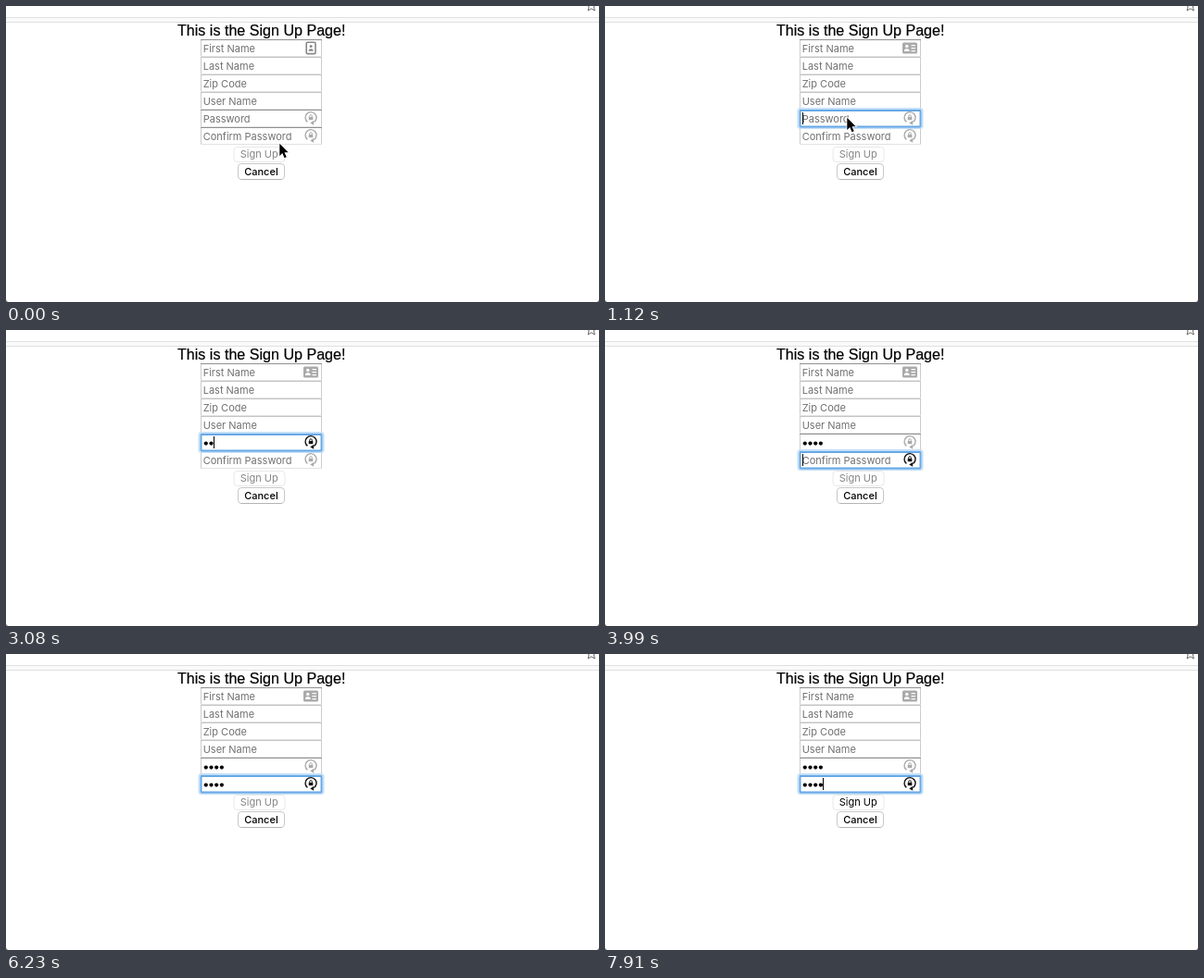
An HTML page that plays this animation: 640 px wide and 320 px high, repeating every 8000 ms.

```html
<!DOCTYPE html>
<html lang="en">
<head>
<meta charset="utf-8">
<title>Sign up form</title>
<style>
html, body { margin: 0; width: 100%; height: 100%; overflow: hidden; background: #fff; }
svg { display: block; }
text { font: 11px Inter, Roboto, sans-serif; fill: #717171; }
.title { font: 16.08px "Liberation Sans", Arial, sans-serif; fill: #000; stroke: #000; stroke-width: .2px; }
.button { text-anchor: middle; }
.lock { color: #aaa; }
.lock.active { color: #111; }
</style>
</head>
<body>
<svg width="640" height="320" viewBox="0 0 640 320">
  <defs>
    <g id="lock" fill="none" stroke="currentColor">
      <path d="M-3.6 4.6A6 6 0 1 1 3.4 4.8" stroke-width="1.4"/>
      <path d="M-.8 5.6L3 3.2 3.2 8Z" fill="currentColor" stroke="none"/>
      <path d="M-1.3 -.6V-1.8A1.3 1.3 0 0 1 1.3 -1.8V-.6" stroke-width=".9"/>
      <path d="M-2.3 -.8H2.3V2.4H-2.3Z" fill="currentColor" stroke="none"/>
    </g>
  </defs>

  <path d="M0 12H640V17H0Z" fill="#fafafa"/>
  <path d="M0 12.5H640M0 17.5H640" stroke="#e0e0e0"/>
  <path d="M626 -1.5L629.2 .6 628.2 5 631.8 2.8 635.4 5 634.4 .6 637.6 -1.5" fill="none" stroke="#666"/>
  <path d="M0 318V320H2ZM640 318V320H638Z" fill="#777"/>
  <text class="title" x="185" y="32">This is the Sign Up Page!</text>

  <g id="fields"></g>

  <g id="badge">
    <rect x="324.2" y="39.2" width="9.8" height="12.4" rx="1.4" fill="#fff" stroke="#888" stroke-width="1.6"/>
    <circle cx="329.1" cy="43.6" r="1.5" fill="#888"/>
    <path d="M326.6 48.8V47.6Q329.1 44.8 331.6 47.6V48.8Z" fill="#888"/>
  </g>
  <g id="card">
    <rect x="321" y="39.5" width="16" height="12" rx="1.5" fill="#aaa"/>
    <circle cx="325.8" cy="43.4" r="1.7" fill="#fff"/>
    <path d="M323 49V47.6Q325.8 44.4 328.6 47.6V49ZM330.5 42H335V43.2H330.5ZM330.5 45H335V46.2H330.5ZM330.5 48H335V49.2H330.5Z" fill="#fff"/>
  </g>

  <g id="ring" fill="none">
    <rect x="208.5" y="111" width="134" height="21" rx="2.5" stroke="#c4dff8" stroke-width="2"/>
    <rect x="210.5" y="113" width="130" height="17.5" rx="1" stroke="#66a8e6" stroke-width="2"/>
  </g>
  <use class="lock" href="#lock" x="329" y="120.8"/>
  <use class="lock" href="#lock" x="329" y="139.8"/>
  <g id="dots"></g>
  <path id="caret" d="M0 0V13" stroke="#000"/>

  <rect x="246" y="152.5" width="55" height="16" rx="3.5" fill="#fff" stroke="#e8e8e8"/>
  <text class="button" id="submit" x="273.3" y="164">Sign Up</text>
  <rect x="250.5" y="170.5" width="50" height="17" rx="3.5" fill="#fff" stroke="#c8c8c8"/>
  <path d="M253.5 187.5H297.5" stroke="#b4b4b4"/>
  <text class="button" x="275.4" y="183" style="fill:#000;font-weight:500">Cancel</text>

  <path id="pointer" d="M1.3 1.8V14.9L4.3 12.1 6.5 17.2 8.7 16.2 6.5 11.3H10.6Z" stroke="#fff" stroke-width="1.4" paint-order="stroke"/>
</svg>
<script>
const $ = id => document.getElementById(id);
const LOOP = 8000, STEP = 70;
const FOCUS = 1120, TYPE = 2800, NEXT = 3990;
const labels = ["First Name", "Last Name", "Zip Code", "User Name", "Password", "Confirm Password"];

// [time, x, y]
const path = [[0, 294, 147], [490, 270, 98], [840, 243, 45], [1050, 260, 119],
  [1190, 260, 119], [1540, 271, 97], [1820, 271, 97], [2170, 280, 74]];
// [time, characters entered]
const password = [[2800, 1], [3080, 2], [3220, 3], [3500, 4]];
const confirmation = [[4550, 1], [4830, 2], [5110, 3], [5670, 4],
  [6510, 3], [6650, 2], [6790, 1], [7000, 0], [7280, 1], [7490, 2], [7630, 3], [7770, 4]];
const caretShown = [[1120, 1540], [2030, 2520], [2800, 4480], [4550, 5600], [5670, 6230], [6650, LOOP]];

$("fields").innerHTML = labels.map((label, i) => {
  const y = 36 + 19 * i, top = i % 4 && i < 5 ? "#c4c4c4" : "#909090";
  return `<path d="M210.5 ${y}V${y + 19}M340.5 ${y}V${y + 19}" stroke="#ccc"/>
    <path d="M210 ${y + 18.5}H341" stroke="#e2e2e2"/>
    <path d="M210 ${y + .5}H341" stroke="${top}"/>
    <text x="212.7" y="${y + 14.2}">${label}</text>`;
}).join("");

const hints = [...$("fields").querySelectorAll("text")].slice(4);
const locks = document.querySelectorAll(".lock");
const show = (el, on) => el.setAttribute("visibility", on ? "visible" : "hidden");
const move = (el, x, y) => el.setAttribute("transform", `translate(${x} ${y})`);
const countAt = (keys, t) => keys.reduce((n, [time, value]) => t >= time ? value : n, 0);

function pointAt(t) {
  const i = path.findIndex(p => p[0] > t);
  if (i < 0) return path.at(-1).slice(1);
  const [t0, x0, y0] = path[i - 1], [t1, x1, y1] = path[i];
  const k = (t - t0) / (t1 - t0);
  return [x0 + (x1 - x0) * k, y0 + (y1 - y0) * k];
}

function draw(t) {
  const counts = [countAt(password, t), countAt(confirmation, t)];
  const row = t >= NEXT ? 1 : 0;

  show($("badge"), t < FOCUS);
  show($("card"), t >= FOCUS);
  show($("ring"), t >= FOCUS);
  move($("ring"), 0, 19 * row);
  locks[0].classList.toggle("active", t >= 1330 && !row);
  locks[1].classList.toggle("active", row === 1);

  hints.forEach((hint, i) => show(hint, !counts[i]));
  $("dots").innerHTML = counts.map((n, r) => Array.from({ length: n }, (_, i) =>
    `<circle cx="${215.8 + 5.7 * i}" cy="${122.6 + 19 * r}" r="2.1"/>`).join("")).join("");

  show($("caret"), caretShown.some(([from, to]) => t >= from && t < to));
  move($("caret"), Math.round(213 + 5.6 * counts[row]) + .5, 115 + 19 * row);
  $("submit").style.fill = t >= 7770 ? "#000" : "#858585";

  show($("pointer"), t < TYPE);
  move($("pointer"), ...pointAt(t));
}

const start = performance.now();
function frame() {
  const t = (performance.now() - start) % LOOP;
  draw(Math.floor(t / STEP) * STEP);
  requestAnimationFrame(frame);
}
frame();
</script>
</body>
</html>
```
